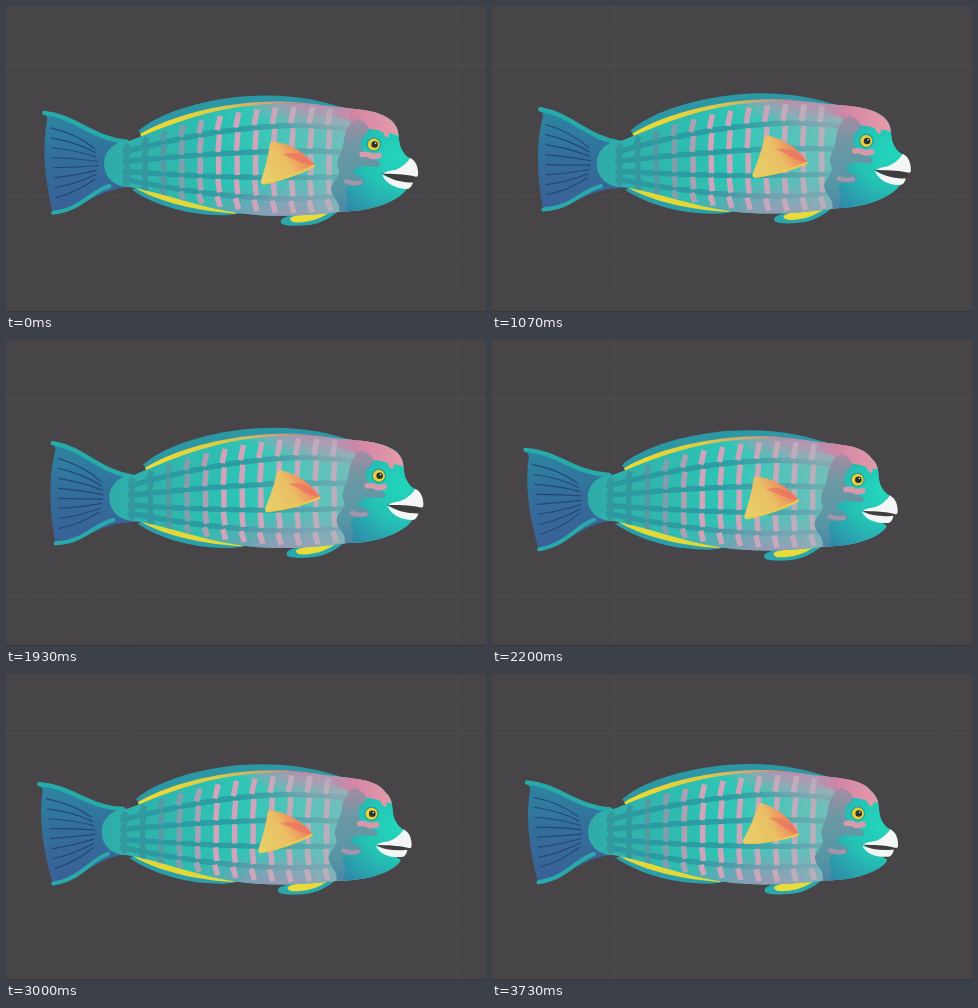
Animation of 480 by 306 pixels, one loop 3.79 s. Source, as an HTML page:

```html
<!DOCTYPE html>
<html lang="en">
<head>
<meta charset="utf-8">
<title>Swimming fish</title>
<style>
html, body { margin: 0; width: 100%; height: 100%; overflow: hidden; background: #474547; }
svg { display: block; width: 100vw; height: 100vh; }
</style>
</head>
<body>
<svg viewBox="0 0 480 306" fill="none" stroke-linecap="round" stroke-linejoin="round">
  <defs>
    <clipPath id="clip"><path class="outline"/></clipPath>
    <linearGradient id="tailFill" x1="0" y1="0" x2="0" y2="1">
      <stop offset="0" stop-color="#2c86a1"/><stop offset=".45" stop-color="#336f9b"/><stop offset="1" stop-color="#3a6097"/>
    </linearGradient>
    <linearGradient id="skin" gradientUnits="userSpaceOnUse" x1="98" y1="0" x2="400" y2="0">
      <stop offset="0" stop-color="#2fabaa"/><stop offset=".25" stop-color="#2fb9ae"/><stop offset=".5" stop-color="#2dc7b7"/><stop offset="1" stop-color="#2cc9b8"/>
    </linearGradient>
    <radialGradient id="face" gradientUnits="userSpaceOnUse" cx="393" cy="150" r="74">
      <stop offset="0" stop-color="#22d6bb"/><stop offset=".45" stop-color="#24c3b5"/><stop offset="1" stop-color="#2f86a8"/>
    </radialGradient>
    <radialGradient id="belly" gradientUnits="userSpaceOnUse" cx="0" cy="0" r="1" gradientTransform="translate(285 214) scale(112 42)">
      <stop offset="0" stop-color="#a18bb2"/><stop offset=".4" stop-color="#8d93b3" stop-opacity=".75"/><stop offset="1" stop-color="#6f9cb4" stop-opacity="0"/>
    </radialGradient>
    <linearGradient id="yellow" gradientUnits="userSpaceOnUse" x1="135" y1="0" x2="310" y2="0">
      <stop offset="0" stop-color="#f0dc2e"/><stop offset=".45" stop-color="#dccb45"/><stop offset=".75" stop-color="#cda27c"/><stop offset="1" stop-color="#cb6f9d"/>
    </linearGradient>
    <radialGradient id="pink" gradientUnits="userSpaceOnUse" cx="0" cy="0" r="1" gradientTransform="translate(322 92) rotate(7) scale(100 36)">
      <stop offset="0" stop-color="#cf659f"/><stop offset=".4" stop-color="#cc78a5" stop-opacity=".85"/><stop offset="1" stop-color="#cf8fae" stop-opacity="0"/>
    </radialGradient>
    <linearGradient id="veil" gradientUnits="userSpaceOnUse" x1="235" y1="0" x2="345" y2="0">
      <stop offset="0" stop-color="#a9b9bd" stop-opacity="0"/><stop offset="1" stop-color="#a3b8bd" stop-opacity=".6"/>
    </linearGradient>
    <linearGradient id="brow" gradientUnits="userSpaceOnUse" x1="322" y1="0" x2="392" y2="0">
      <stop offset="0" stop-color="#cc6fa0" stop-opacity="0"/><stop offset=".4" stop-color="#d487a6"/><stop offset="1" stop-color="#e59ba8"/>
    </linearGradient>
    <linearGradient id="cheek" gradientUnits="userSpaceOnUse" x1="0" y1="112" x2="0" y2="206">
      <stop offset="0" stop-color="#a98ba3"/><stop offset=".3" stop-color="#6c98a4"/><stop offset=".75" stop-color="#5596a4"/><stop offset="1" stop-color="#4a86a8"/>
    </linearGradient>
    <linearGradient id="finFill" gradientUnits="userSpaceOnUse" x1="258" y1="174" x2="300" y2="143">
      <stop offset="0" stop-color="#e6d06a"/><stop offset=".55" stop-color="#ebbf65"/><stop offset=".85" stop-color="#ee8f5e"/><stop offset="1" stop-color="#ea7662"/>
    </linearGradient>
  </defs>
  <rect width="480" height="306" fill="#474547"/>
  <g id="grid" stroke-width="1"></g>
  <rect y="305" width="480" height="1" fill="#393739"/>

  <g id="fish">
    <g id="tail">
      <path fill="url(#tailFill)" d="M40,106C72,111 88,136 130,136V181C92,181 80,202 47,206C39,170 37,140 43,112Z"/>
      <g id="rays" stroke="#23406f" stroke-opacity=".85" stroke-width="1.200"></g>
      <path stroke="#27abaa" stroke-width="4.400" d="M40,106C72,110 88,133 122,136"/>
      <path stroke="#2aa9ad" stroke-width="4" d="M47.500,206C76,203 84,186 104,180"/>
    </g>

    <path fill="#2c98a6" d="M133,125C150,109 192,94 240,90C280,87 312,92 346,104L340,116L140,133Z"/>
    <path fill="url(#yellow)" d="M135,128C160,113 200,100 250,96C280,94 300,96 318,99L300,106C240,100 190,108 142,131Q136,132 135,128Z"/>
    <path fill="#2a9fa9" d="M127,184C146,197 180,210 222,209L244,206L140,178Z"/>
    <path fill="#e4d838" d="M130,182C150,193 180,204 232,207.500L226,203L145,180Z"/>
    <path fill="#2aa7ac" d="M276,214C280,208 298,207 333,205C323,213 314,218 300,219C288,220 273,220 276,214Z"/>
    <path fill="#e9dc3a" d="M285,212C292,207 308,207 325,206C316,212 308,215 296,216Q285,217 285,212Z"/>

    <path class="outline" fill="url(#skin)"/>
    <g clip-path="url(#clip)">
      <g id="bands" stroke="#2b929c" stroke-opacity=".75"></g>
      <rect x="170" y="165" width="240" height="50" fill="url(#belly)"/>
      <rect x="220" y="90" width="200" height="70" fill="url(#pink)"/>
      <g id="bars" stroke-linecap="butt"></g>
      <path fill="url(#veil)" d="M235,90H345V215H235Z"/>
      <path fill="url(#face)" d="M352,110H420V192Q385,202 336,212L336,190L350,160Z"/>
      <path fill="url(#brow)" d="M322,95H402V131C394,133 390,124 381,128C370,119 360,126 352,117L322,108Z"/>
      <path fill="url(#cheek)" d="M352,112C361,116 368,122 359,129C354,133 355,140 359,147C365,153 376,153 375,158C373,164 359,156 350,162C343,169 358,169 359,175C359,181 347,178 342,181C337,186 347,193 340,205L334,205C336,195 327,192 326,183C326,174 337,171 333,162C330,154 336,148 338,138C340,126 341,119 352,112Z"/>
      <path stroke="#d899ac" stroke-width="5.500" d="M357,148Q363,147 367,150L374,149"/>
      <path stroke="#a395ab" stroke-width="4.500" d="M341,175Q349,178 355,176"/>
      <path stroke="#e39aa8" stroke-width="3.500" d="M380,127L382,129"/>
    </g>
    <circle cx="368.700" cy="138" r="7.200" fill="#2a9a98"/>
    <circle cx="368.700" cy="138" r="6" fill="#e8cf3a"/>
    <circle cx="369.500" cy="138" r="3.300" fill="#29332f"/>
    <circle cx="370.500" cy="136.800" r=".8" fill="#fff"/>

    <g id="snout">
      <path id="gap" fill="#3d3c3e"/>
      <path id="jaw" fill="#f4f5f5" d="M377,168C386,173 396,176 408,176Q406,182 402,182.500C391,182 381,178 377,168Z"/>
      <path fill="#f4f5f5" d="M377,167Q384,164 390,163.500C397,161 402,156 405,151.500C411,154 413,161 413,167Q413,171 410,170C398,167 388,168 377,167Z"/>
    </g>

    <g id="fin">
      <path fill="url(#finFill)" d="M310,159C300,146 284,138 268,136Q264,136 264,141C262,156 259,166 256,176Q256,180 260,179C278,174 294,168 310,159Z"/>
      <path fill="#e96c63" fill-opacity=".6" d="M307,158C298,147 288,145 277,149C287,151 296,159 307,158Z"/>
      <path stroke="#efc94e" stroke-width="2.200" d="M309,159.500C296,167 281,173 260,178"/>
    </g>
  </g>
</svg>
<script>
const LOOP = 3790, STEP = 200 / 3, SWIM = 785, FLAP = 2200;
const $ = id => document.getElementById(id);
const clamp = v => Math.max(0, Math.min(1, v));
const mix = (a, b, k) => a + (b - a) * k;

function add(parent, d, attrs = {}) {
  const el = document.createElementNS("http://www.w3.org/2000/svg", "path");
  el.setAttribute("d", d);
  for (const name in attrs) el.setAttribute(name, attrs[name]);
  $(parent).append(el);
}

// Height on the flank: 0 is the back, 1 the belly.
function flank(x, f) {
  const top = 98 + 38 * Math.abs((290 - x) / 165) ** 1.75;
  const bottom = 209 - 28 * Math.abs((285 - x) / 160) ** 1.8;
  return mix(top, bottom, f);
}

function drawGrid() {
  const tone = major => ({ stroke: major ? "#514f51" : "#4a484a" });
  for (let x = 23; x < 480; x += 33) add("grid", `M${x},0V306`, tone((x - 122) % 330 === 0));
  for (let y = 26; y < 306; y += 33) add("grid", `M0,${y}H480`, tone(y === 59));
}

function drawRays() {
  for (let i = 0; i < 8; i++) {
    const y = 121 + i * 10, end = 142 + i * 4.4;
    add("rays", `M${46 + i * 0.6},${y}Q72,${mix(y, end, 0.3)} ${93 - Math.abs(i - 3.5)},${end}`);
  }
}

function drawScales() {
  for (const f of [0.19, 0.42, 0.66, 0.85]) {
    let d = "";
    for (let x = 120; x <= 345; x += 9) d += (d ? "L" : "M") + x + "," + flank(x, f).toFixed(1);
    add("bands", d, { "stroke-width": 5.5 });
  }
  const rows = [[0.02, 0.17], [0.215, 0.4], [0.45, 0.64], [0.685, 0.83], [0.87, 0.98]];
  rows.forEach(([a, b], row) => {
    const lean = (2 - row) * 0.8;
    for (let x = 121.6; x < 335; x += 18.4) {
      const k = clamp((x - 145) / 65);
      const rgb = [mix(52, 208, k), mix(152, 164, k), mix(158, 186, k)].map(Math.round);
      add("bars", `M${x + lean},${flank(x, a)}L${x - lean},${flank(x, b)}`,
        { stroke: `rgb(${rgb})`, "stroke-width": 5.5 });
    }
  });
}

function bodyPath(shut) {
  const p = (x, y) => `${x - 4 * shut},${y + 2 * shut}`;
  return "M99,158C99,145 109,135 124,135C150,125 190,106 240,100C275,96 300,96 325,100" +
    `C350,103 373,103 ${p(386, 114)}C${p(397, 124)} ${p(391, 133)} ${p(397, 144)}` +
    `Q${p(401, 151)} ${p(406, 152)}L${p(400, 164)}L${p(378, 167)}L${p(402, 182)}` +
    "C396,192 372,205 337,205C300,210 265,211 235,207C195,202 160,187 124,181C109,181 99,171 99,158Z";
}

function draw(t) {
  const wave = shift => Math.cos(2 * Math.PI * (t - 2200 - shift) / SWIM);
  const dx = 1.3 - 4.6 * wave(20);
  const sweep = 3.15 - 7.45 * ((1 + wave(40)) / 2) ** 2.8;
  const open = clamp((0.93 - wave(-10)) / 0.6);
  const shut = 1 - open;
  const flap = 4 + 7 * Math.cos(2 * Math.PI * (t - 1500) / FLAP);

  $("fish").setAttribute("transform", `translate(${dx} 0) rotate(${-0.115 * dx} 110 157)`);
  $("tail").setAttribute("transform", `translate(${-0.2 * wave(20)} 0) rotate(${sweep} 105 157)`);
  $("fin").setAttribute("transform", `rotate(${flap} 310 159)`);
  $("snout").setAttribute("transform", `translate(${-4 * shut} ${2 * shut})`);
  $("jaw").setAttribute("transform", `rotate(${-8 * shut} 378 168)`);
  $("gap").setAttribute("d", `M376,166.5Q392,166 411,169L${mix(410, 408, open)},${mix(172, 177, open)}Q390,${mix(172, 176, open)} 376,166.5Z`);
  const d = bodyPath(shut);
  document.querySelectorAll(".outline").forEach(el => el.setAttribute("d", d));
}

drawGrid();
drawRays();
drawScales();

const start = performance.now();
function tick() {
  const t = (performance.now() - start) % LOOP;
  draw(Math.floor((t + 3.4) / STEP) * STEP);
  requestAnimationFrame(tick);
}
tick();
</script>
</body>
</html>
```
